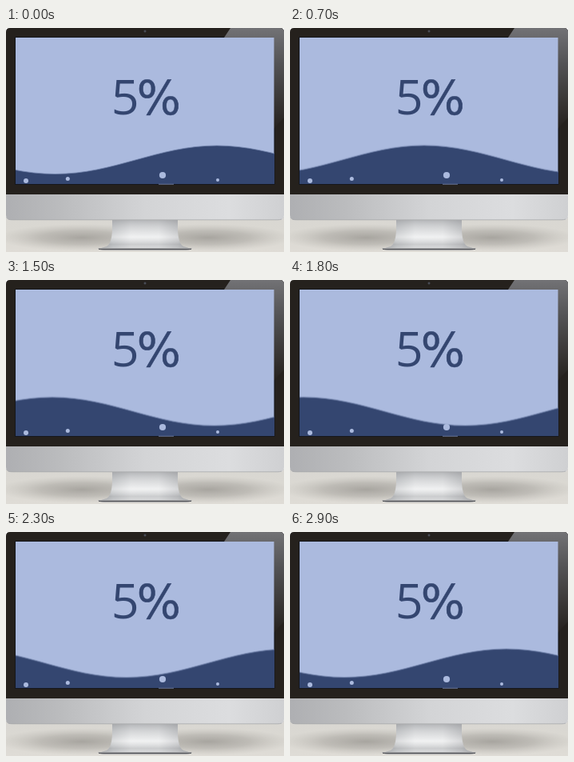
These frames come from a looping animation (348x280 px, 3000 ms). An HTML page:

```html
<!DOCTYPE html>
<html lang="en">
<head>
<meta charset="utf-8">
<title>Filling screen</title>
<style>
html, body { margin: 0; width: 100%; height: 100%; overflow: hidden; background: #fff; }
svg { display: block; width: 348px; height: 280px; }
.wave { animation: drift 3s steps(30) infinite; }
@keyframes drift { to { transform: translate(-412px, -.9px); } }
.label { font: 61px "Open Sans", "Noto Sans", sans-serif; fill: #344670; }
.unit { font: 58px "DejaVu Sans", sans-serif; stroke: #344670; stroke-width: .5; }
</style>
</head>
<body>
<svg viewBox="0 0 348 280">
  <defs>
    <clipPath id="screen"><rect x="12" y="12" width="323.5" height="183"/></clipPath>
    <linearGradient id="floor" x2="0" y2="1">
      <stop offset="0" stop-color="#d9d7d2"/>
      <stop offset=".5" stop-color="#dad8d2"/>
      <stop offset="1" stop-color="#dfdcd6"/>
    </linearGradient>
    <radialGradient id="shadow">
      <stop offset="0" stop-color="#85827d" stop-opacity=".6"/>
      <stop offset=".5" stop-color="#908d88" stop-opacity=".38"/>
      <stop offset="1" stop-color="#aaa7a2" stop-opacity="0"/>
    </radialGradient>
    <linearGradient id="chin">
      <stop offset="0" stop-color="#aeafb2"/>
      <stop offset=".2" stop-color="#bbbcbe"/>
      <stop offset=".5" stop-color="#d3d4d6"/>
      <stop offset=".8" stop-color="#dcdddf"/>
      <stop offset="1" stop-color="#cfd0d2"/>
    </linearGradient>
    <linearGradient id="glare" x2="0" y2="1">
      <stop offset="0" stop-color="#727275"/>
      <stop offset=".35" stop-color="#535355"/>
      <stop offset="1" stop-color="#25211d"/>
    </linearGradient>
    <linearGradient id="neck">
      <stop offset="0" stop-color="#a2a4a7"/>
      <stop offset=".15" stop-color="#cfd1d3"/>
      <stop offset=".35" stop-color="#ecedee"/>
      <stop offset=".65" stop-color="#ebeced"/>
      <stop offset=".85" stop-color="#cbccce"/>
      <stop offset="1" stop-color="#9b9da0"/>
    </linearGradient>
    <linearGradient id="neckShade" x2="0" y2="1">
      <stop offset="0" stop-color="#808286" stop-opacity=".55"/>
      <stop offset=".35" stop-color="#a9abae" stop-opacity=".25"/>
      <stop offset=".6" stop-color="#fff" stop-opacity=".25"/>
      <stop offset=".85" stop-color="#8f9194" stop-opacity=".35"/>
      <stop offset="1" stop-color="#b0b1b3" stop-opacity=".3"/>
    </linearGradient>
    <path id="stand" d="M133 239H215V254Q216 270 222 273L232 276H116L126 273Q132 270 133 254Z"/>
  </defs>

  <rect y="236" width="348" height="44" fill="url(#floor)"/>
  <ellipse cx="95" cy="262" rx="105" ry="17" fill="url(#shadow)"/>
  <ellipse cx="253" cy="262" rx="105" ry="17" fill="url(#shadow)"/>

  <use href="#stand" fill="url(#neck)"/>
  <use href="#stand" fill="url(#neckShade)"/>
  <path d="M115 275H233Q231 278 225 278H123Q117 278 115 275Z" fill="#a3a4a6"/>
  <path d="M116 276.5H232" stroke="#55565a"/>

  <path d="M0 207H348V234Q348 240 342 240H6Q0 240 0 234Z" fill="url(#chin)"/>
  <path d="M3 239Q5 239.8 8 239.8H340Q343 239.8 345 239" fill="none" stroke="#a8a9ab" stroke-width=".8"/>
  <path d="M0 208V5Q0 0 5 0H343Q348 0 348 5V208Z" fill="#25211d"/>
  <rect x="11" y="11" width="325.5" height="185" fill="#15171c"/>
  <path d="M281 0H343Q348 0 348 5V112L335 126V12H273Z" fill="url(#glare)"/>
  <circle cx="174" cy="4" r="1.5" fill="#484c55"/>

  <g clip-path="url(#screen)">
    <rect x="12" y="12" width="324" height="183" fill="#abbade"/>
    <path class="wave" fill="#344670" stroke="#7183ab" stroke-width=".8"
      d="M-141 202V147C-67.25 147 -12.25 182.5 61.5 182.5S190.25 147 264 147S392.75 182.5 466.5 182.5S595.25 147 669 147S797.75 182.5 871.5 182.5V202Z"/>
    <g fill="#abbade">
      <circle cx="25" cy="191" r="3"/>
      <circle cx="77.3" cy="188.4" r="2.5"/>
      <circle cx="196" cy="184" r="4.1"/>
      <circle cx="265" cy="190" r="2"/>
    </g>
  </g>
  <path d="M191 195.3H210" stroke="#7e8cae" stroke-width=".8"/>
  <text class="label" x="131.8" y="108">5<tspan class="unit" x="163.8">%</tspan></text>
</svg>
</body>
</html>
```
